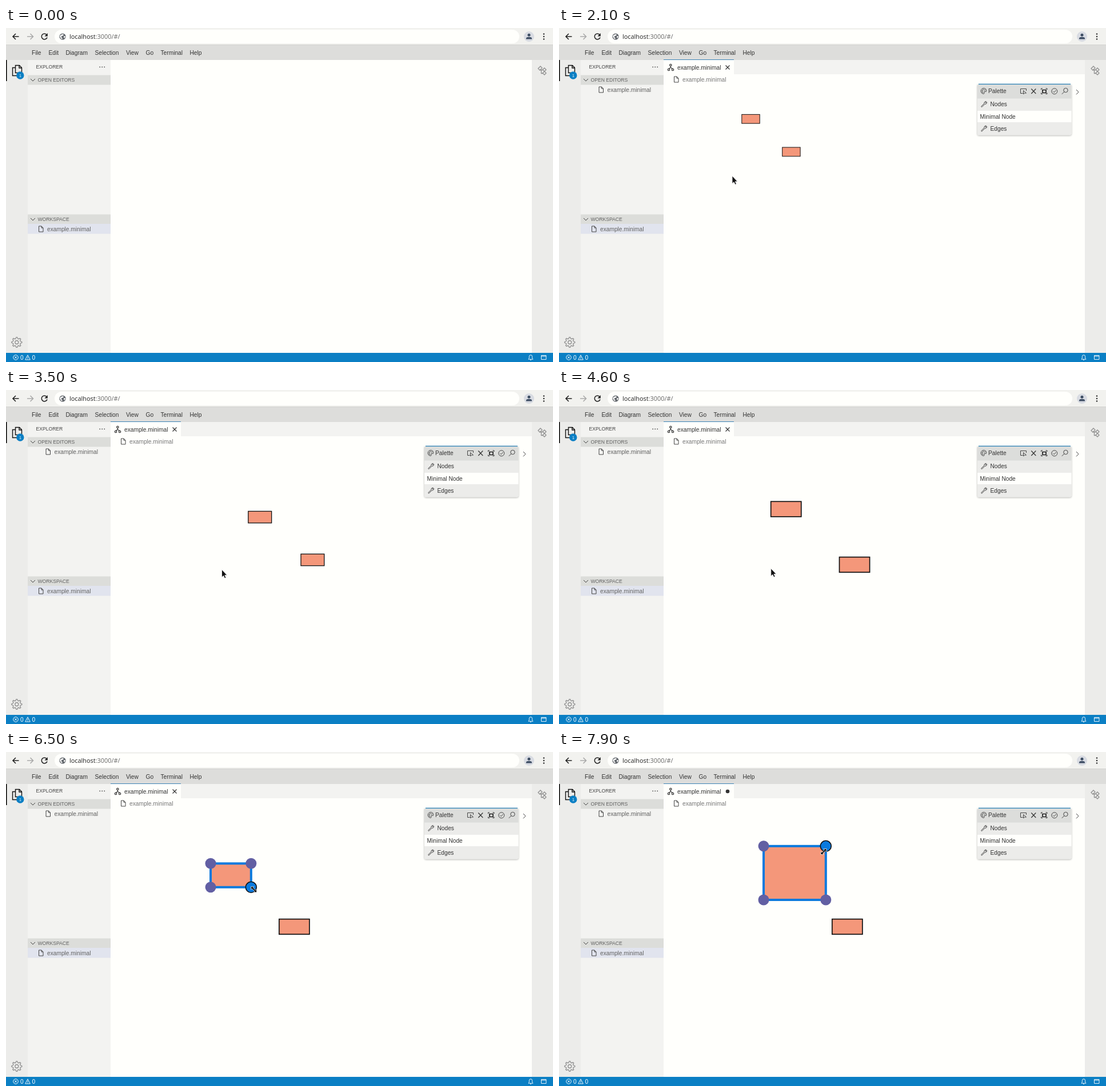
An HTML page for the animation above (8 s loop, 957 by 585 pixels).

```html
<!DOCTYPE html>
<html lang="en">
<head>
<meta charset="utf-8">
<title>Diagram editor</title>
<style>
  html, body { margin: 0; width: 100%; height: 100%; overflow: hidden; background: #fffffc; }
  svg { display: block; width: 100vw; height: 100vh; }
  text { font: 10.2px "Liberation Sans", Arial, sans-serif; fill: #333; white-space: pre; }
  .caps { font-size: 8.6px; fill: #444; }
  .soft { fill: #616161; }
  .url { font: 10.9px "Open Sans", sans-serif; fill: #222; }
  .status { fill: #fff; }
  .line { fill: none; stroke: #444; stroke-width: 1; }
  .pale { stroke: #909090; }
  .node { fill: #f4977a; stroke: #111; }
</style>
</head>
<body>
<svg viewBox="0 0 957 585" preserveAspectRatio="none">
  <defs>
    <path id="file" class="line" d="M.5 .5H5L8 3.6V10.5H.5ZM5 .5V3.6H8"/>
    <path id="fold" class="line" stroke="#555" d="M0 0l4 4 4-4"/>
    <path id="wrench" class="line" d="M.8 9.2L6 4.2A2.8 2.8 0 0 1 9.4 .8L7.7 2.5 8.7 3.5 10.4 1.8A2.8 2.8 0 0 1 7 5.3L2 10.4A.9 .9 0 0 1 .8 9.2Z"/>
    <filter id="shadow" x="-10%" y="-10%" width="120%" height="125%">
      <feDropShadow dx="0" dy="1" stdDeviation="1.8" flood-opacity=".32"/>
    </filter>
  </defs>

  <!-- browser bar -->
  <rect width="957" height="30" fill="#f2f2ef"/>
  <rect x="85" y="3" width="813" height="24" rx="12" fill="#fffffc"/>
  <path class="line" style="stroke:#222;stroke-width:1.6" d="M22.5 15H12M17 10l-5 5 5 5M71.3 12A5 5 0 1 0 72 16.5"/>
  <path d="M72.8 9v5.4h-5.4z" fill="#222"/>
  <path class="line" style="stroke:#aaa;stroke-width:1.6" d="M37 15h10.5M42.500 10l5 5-5 5"/>
  <circle cx="99" cy="15" r="5.6" fill="#5d6267"/>
  <path d="M95 12.5l4-2 2 1-1 2-3 1v2l2 1-1 2-2-1-2-4zM101 14l2.800 0-.5 3-2 1z" fill="#eee"/>
  <text class="url" x="111" y="19">localhost<tspan fill="#666">:3000/#/</tspan></text>
  <circle cx="915" cy="15" r="9" fill="#d8dbe2"/>
  <circle cx="915" cy="12.300" r="2.5" fill="#3d4d63"/>
  <path d="M910 19.500v-1.500c0-3 10-3 10 0v1.500z" fill="#3d4d63"/>
  <g fill="#333"><circle cx="941" cy="10.500" r="1.300"/><circle cx="941" cy="15" r="1.300"/><circle cx="941" cy="19.500" r="1.300"/></g>

  <!-- menu -->
  <rect y="30" width="957" height="26" fill="#dddddb"/>
  <path d="M0 29.500H957" stroke="#d3d3d0"/>
  <g id="menu"></g>

  <!-- side panels -->
  <rect y="56" width="38" height="513" fill="#ececea"/>
  <rect x="38" y="56" width="145" height="513" fill="#f3f3f1"/>
  <rect x="920" y="56" width="37" height="513" fill="#ececea"/>
  <rect y="56" width="1.500" height="37" fill="#000"/>
  <path class="line" style="stroke:#111;stroke-width:1.400" d="M16.500 65.500H23.500L27.500 69.500V78.500H16.500ZM23 65.500V70H27.500M16.500 69.500H11.500V83.500H21V79"/>
  <circle cx="24.800" cy="83" r="6.700" fill="#0b7fc4"/>
  <text x="23" y="85.600" style="font-size:7px;fill:#fff">1</text>
  <path id="gear" class="line pale" style="stroke-width:1.300"/>
  <circle class="line pale" cx="18.800" cy="550.500" r="3" style="stroke-width:1.300"/>
  <g class="line pale" style="stroke-width:1.300">
    <path d="M934 73.500h5M936.500 73.500v6h3"/>
    <path d="M931 71l4-4 3 3-4 4zM939 73l3-3 3 3-3 3zM939 79l3-3 3 3-3 3z"/>
  </g>

  <text class="caps" x="52.500" y="71.300">EXPLORER</text>
  <g fill="#444"><circle cx="164.200" cy="68.300" r=".9"/><circle cx="168.200" cy="68.300" r=".9"/><circle cx="172.200" cy="68.300" r=".9"/></g>
  <path d="M38 82.500h145v17H38zM38 326.500h145v16.500H38z" fill="#dcddda"/>
  <use href="#fold" x="43" y="89"/>
  <use href="#fold" x="43" y="333"/>
  <text class="caps soft" x="55.500" y="94.200">OPEN EDITORS</text>
  <text class="caps soft" x="55.500" y="338.200">WORKSPACE</text>
  <rect x="38" y="343" width="145" height="17.500" fill="#e1e4ee"/>
  <use href="#file" x="57" y="346.500"/>
  <text class="soft" x="72" y="355.500">example.minimal</text>

  <!-- opened editor -->
  <g id="editor">
    <use href="#file" x="69.500" y="102.500"/>
    <text class="soft" x="84.500" y="111.500">example.minimal</text>
    <rect x="183" y="56" width="737" height="25" fill="#f3f3f1"/>
    <rect x="183" y="55" width="123" height="26" fill="#fffffc"/>
    <rect x="183" y="55" width="123" height="1" fill="#3d83b5"/>
    <g class="line" style="stroke:#333;stroke-width:1.200"><circle cx="195.300" cy="65" r="1.700"/><circle cx="192" cy="73" r="1.700"/><circle cx="199" cy="73" r="1.700"/><path d="M195.300 67v2.500M192.300 71.300l3-2 3.200 2"/></g>
    <text x="207" y="72.500">example.minimal</text>
    <path id="close" class="line" style="stroke:#333;stroke-width:1.200" d="M291.500 65.500l7 7M298.500 65.500l-7 7"/>
    <circle id="dirty" cx="295" cy="69" r="3.300" fill="#333"/>
    <use href="#file" x="201" y="84.500"/>
    <text x="216" y="93.500" style="fill:#777">example.minimal</text>
  </g>

  <g id="diagram">
    <rect id="fixedNode" class="node"/>
    <rect id="mainNode" class="node"/>
    <g id="handles"></g>
  </g>

  <g id="palette">
    <rect x="732" y="98" width="164.500" height="89.500" rx="3" fill="#ececea" filter="url(#shadow)"/>
    <path d="M732 123.500V101q0-2 2-2h160.500q2 0 2 2v22.500z" fill="#dcdddb"/>
    <path d="M734 98.300H895" stroke="#2a82b8" stroke-width="1.200"/>
    <rect x="732" y="145" width="164.500" height="20" fill="#fffffc"/>
    <path class="line" d="M743 105.500a4.800 4.800 0 1 0 0 9.800q1.800-.5 .6-2.200-.5-1.800 1.400-1.800h2.300c1.600-3-1-5.800-4.300-5.800z"/>
    <g fill="#444"><circle cx="740.500" cy="110" r=".9"/><circle cx="742" cy="108" r=".9"/><circle cx="745" cy="108.500" r=".9"/><circle cx="740.800" cy="112.500" r=".9"/></g>
    <text x="751" y="114.200">Palette</text>
    <path class="line" d="M811.500 114.500H807.500V106.500H817.500V110M812.500 109.500v6.500l2-2h3z"/>
    <path class="line" style="stroke:#333;stroke-width:1.200" d="M826.300 106.500l8 8.500M834.300 106.500l-8 8.500"/>
    <path class="line" style="stroke:#222;stroke-width:1.700" d="M846 108.500h6v5h-6z"/>
    <path class="line" style="stroke:#333" d="M843.500 108v-2h2.500M851.500 106h2.500v2M854 113.500v2h-2.500M846 115.500h-2.500v-2"/>
    <circle class="line" cx="866.800" cy="110.800" r="5"/>
    <path class="line" d="M864.300 110.800l2 2 3.300-3.800"/>
    <circle class="line" cx="886.500" cy="109" r="3.700"/>
    <path class="line" d="M883.800 111.800l-4 4"/>
    <use href="#wrench" x="738" y="128"/>
    <text x="754.500" y="137.300">Nodes</text>
    <text x="736.500" y="158.700">Minimal Node</text>
    <use href="#wrench" x="738" y="170.500"/>
    <text x="754.500" y="179.700">Edges</text>
    <path class="line" d="M905 108l4 4.200-4 4.200"/>
  </g>

  <!-- status bar -->
  <rect y="569" width="957" height="16" fill="#0b7fc4"/>
  <g class="line" style="stroke:#fff;stroke-width:.9">
    <circle cx="17" cy="577" r="4.300"/>
    <path d="M15.200 575.200l3.600 3.600M18.800 575.200l-3.600 3.600M38 572.800l4.300 8.200h-8.600zM38 575.500v2.800M38 579v1"/>
    <path d="M914 580.200l1.300-2v-2.500q0-3 2.700-3t2.700 3v2.500l1.300 2zM917 581.500h2"/>
    <path d="M936.500 573.500h8.500v7h-8.500zM936.500 575h8.500"/>
  </g>
  <text class="status" x="25" y="580.800">0</text>
  <text class="status" x="45.500" y="580.800">0</text>

  <g id="cursor">
    <path id="arrow" d="M0 0V13.500L3 10.800 5.200 15.300 7.400 14.300 5.300 9.900H9.300Z" fill="#111" stroke="#fff" stroke-width=".8"/>
    <path id="resize" d="M-5 -5H.2L-1.400 -3.200 3.200 1.400 5 -.2V5H-.2L1.400 3.200 -3.200 -1.400 -5 .2Z" fill="#111" stroke="#fff" stroke-width=".7"/>
  </g>
</svg>
<script>
const LOOP = 8000, STEP = 100;
const NODE_W = 31.4, NODE_H = 15.75, ZOOM = 1.3;
const GAP = [70.9, 57.6];
const PURPLE = "#625fa3", BLUE = "#0a7ade", SELECTED = "#1c76cf";
const $ = id => document.getElementById(id);
const make = (tag, parent, attrs, text = "") => {
  const el = document.createElementNS("http://www.w3.org/2000/svg", tag);
  set(el, attrs);
  el.textContent = text;
  return parent.appendChild(el);
};
function set(el, attrs) {
  for (const name in attrs) el.setAttribute(name, attrs[name]);
}
const show = (id, on) => set($(id), { display: on ? "inline" : "none" });

// Keys are [time, x, y]; positions between keys are linear.
function follow(keys, t) {
  const next = keys.findIndex(key => key[0] > t);
  if (next < 0) return keys[keys.length - 1].slice(1);
  if (next === 0) return keys[0].slice(1);
  const a = keys[next - 1], b = keys[next], k = (t - a[0]) / (b[0] - a[0]);
  return [a[1] + (b[1] - a[1]) * k, a[2] + (b[2] - a[2]) * k];
}

const pointerPath = [
  [800, 8, 323], [900, 80, 342], [1000, 162, 345], [1100, 125, 348], [1300, 125, 348],
  [2100, 303, 259], [2400, 288, 229], [3000, 381, 314], [3200, 377.5, 314.5], [4000, 377.5, 314.5],
  [4300, 430, 302], [4700, 351, 316], [4900, 349, 316], [5200, 391, 233], [5400, 382.5, 205.5],
  [5900, 382.5, 205.5], [6300, 416, 226], [6800, 460, 263], [6900, 460, 263],
  [7100, 458, 245], [7400, 451, 205], [7500, 451, 205], [7900, 463, 174.5]
];
const originPath = [
  [2400, 319.8, 151.4], [3000, 413.2, 235.8], [3499, 413.2, 235.8], [3500, 423.8, 212.4],
  [3699, 423.8, 212.4], [3700, 437.5, 181.9], [4300, 437.5, 181.9], [4600, 370.7, 195.3], [4700, 358, 195.3]
];
const lowerRight = [[6300, 411.2, 222], [6800, 455.2, 259]];
const upperRight = [[7500, 455.2, 195.3], [7900, 466.8, 164.8]];

const menu = { File: 45, Edit: 74.5, Diagram: 104.5, Selection: 155.5, View: 210, Go: 244.5, Terminal: 270.5, Help: 321.5 };
for (const label in menu) make("text", $("menu"), { x: menu[label], y: 46.7 }, label);

const teeth = Array.from({ length: 32 }, (_, i) => {
  const angle = (i - .5) * Math.PI / 16, r = i % 4 < 2 ? 9 : 6.6;
  return `${18.8 + r * Math.cos(angle)} ${550.5 + r * Math.sin(angle)}`;
});
set($("gear"), { d: `M${teeth.join("L")}Z` });

const handles = [0, 1, 2, 3].map(() => make("circle", $("handles"), { r: 9.5 }));

function drawDiagram(t) {
  const scale = t < 3500 ? 1 : t < 3700 ? ZOOM : ZOOM * ZOOM;
  const [x, y] = follow(originPath, t);
  let top = y, right = x + NODE_W * scale, bottom = y + NODE_H * scale;
  if (t >= 6300) [right, bottom] = follow(lowerRight, t);
  if (t >= 7500) [right, top] = follow(upperRight, t);

  const selected = t >= 5700, hovered = t >= 5200;
  const dragLower = t >= 6300 && t < 6900, dragUpper = t >= 7500;
  const dragging = dragLower || dragUpper;
  set($("mainNode"), {
    x, y: top, width: right - x, height: bottom - top,
    style: hovered ? `stroke:${dragging ? BLUE : SELECTED};stroke-width:4` : `stroke-width:${scale}`
  });
  set($("fixedNode"), {
    x: x + GAP[0] * scale, y: y + GAP[1] * scale,
    width: NODE_W * scale, height: NODE_H * scale, "stroke-width": scale
  });

  const active = t >= 7300 ? 1 : t >= 6200 && t < 7000 ? 3 : -1;
  handles.forEach((handle, i) => set(handle, {
    cx: i % 2 ? right : x, cy: i < 2 ? top : bottom,
    fill: i === active && dragging ? BLUE : PURPLE,
    stroke: i === active ? "#111" : "none", "stroke-width": 1.6
  }));
  show("handles", selected);
}

function drawPointer(t) {
  const [x, y] = follow(pointerPath, t);
  const onLower = t >= 6200 && t < 7000, onUpper = t >= 7300;
  set($("cursor"), { transform: `translate(${x} ${y})` });
  set($("resize"), { transform: onUpper ? "scale(-1 1)" : "" });
  show("cursor", t >= 800);
  show("resize", onLower || onUpper);
  show("arrow", !onLower && !onUpper);
}

function draw(now) {
  const t = Math.floor(now % LOOP / STEP) * STEP;
  show("editor", t >= 1400);
  show("diagram", t >= 1700);
  show("palette", t >= 1800);
  show("close", t < 7000);
  show("dirty", t >= 7000);
  drawDiagram(t);
  drawPointer(t);
}

let start;
function frame(now) {
  start ??= now;
  draw(now - start);
  requestAnimationFrame(frame);
}
draw(0);
requestAnimationFrame(frame);
</script>
</body>
</html>
```
